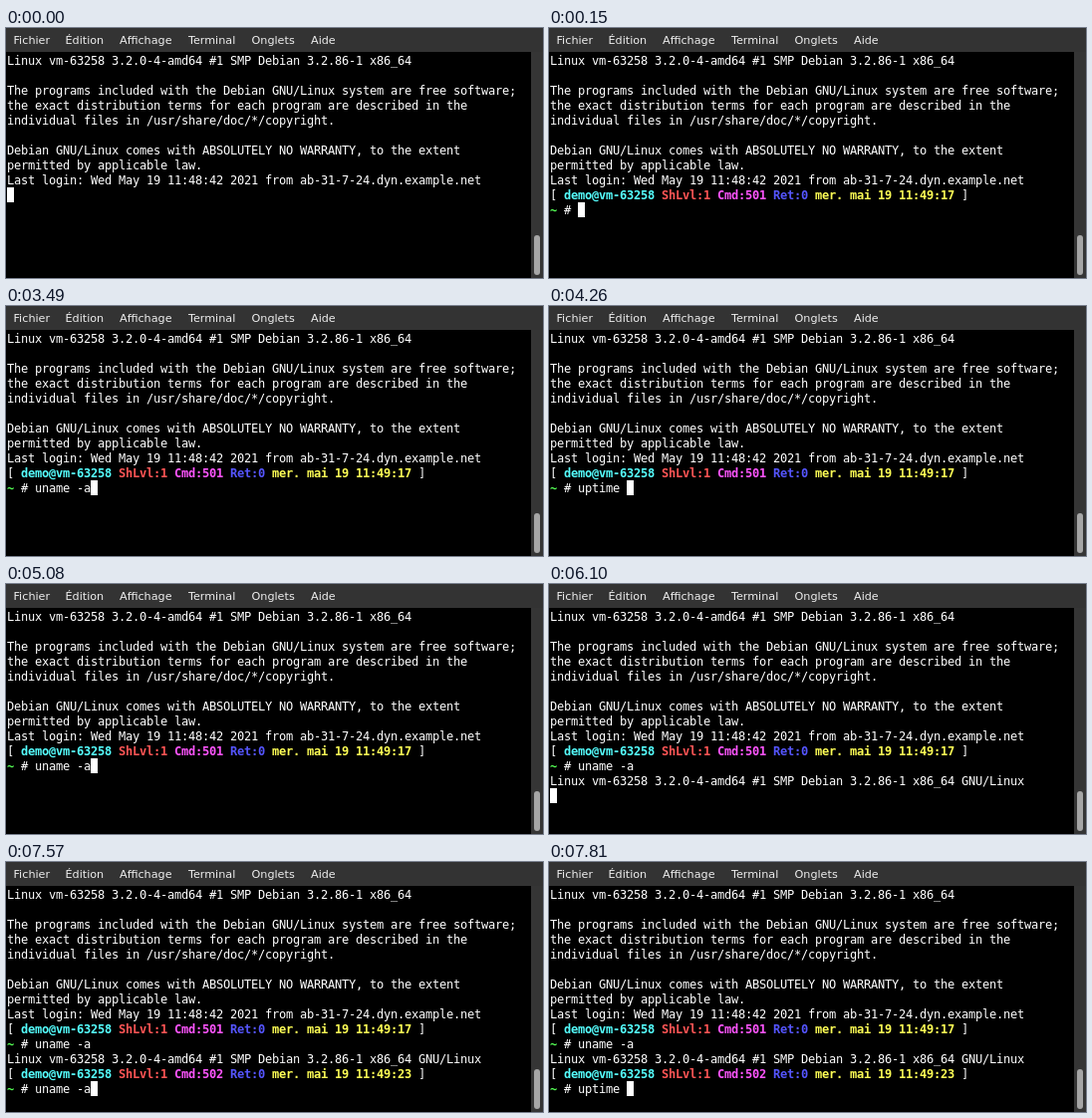
Animation, 539 px wide and 251 px high, one loop 8 s. Source, as an HTML page:

```html
<!DOCTYPE html>
<html lang="fr">
<head>
<meta charset="utf-8">
<title>Terminal</title>
<style>
  html, body { margin: 0; width: 100%; height: 100%; overflow: hidden; background: #000; }
  svg { display: block; }
  text { white-space: pre; }
  .menu { font: 11.2px "DejaVu Sans", sans-serif; fill: #eee; }
  .term { font: 12px "DejaVu Sans Mono", monospace; fill: #fff; }
  .bold { font-weight: bold; }
</style>
</head>
<body>
<svg id="stage" width="539" height="251" viewBox="0 0 539 251">
  <rect width="539" height="251" fill="#000"/>
  <rect width="539" height="24" fill="#333"/>
  <rect x="527" y="24" width="12" height="227" fill="#353535"/>
  <rect x="530" y="208" width="6" height="40" rx="3" fill="#a6a6a6"/>
  <g id="menu" class="menu"></g>
  <g id="screen" class="term"></g>
  <rect id="cursor" width="7" height="15" fill="#fff"/>
</svg>
<script>
const LOOP = 8000, CELL = 7, ROW = 15, LEFT = 1, TOP = 25, BASELINE = 12;
const HOST = 'vm-63258';
const KERNEL = `Linux ${HOST} 3.2.0-4-amd64 #1 SMP Debian 3.2.86-1 x86_64`;
const byId = id => document.getElementById(id);
const screen = byId('screen'), cursor = byId('cursor');

function addText(parent, str, x, y, attrs = {}) {
  const el = document.createElementNS('http://www.w3.org/2000/svg', 'text');
  for (const [key, value] of Object.entries({ x, y, ...attrs })) el.setAttribute(key, value);
  el.textContent = str;
  parent.append(el);
}

// Every character sits on the terminal's cell grid.
function print(row, col, str, color) {
  const xs = Array.from(str, (_, i) => LEFT + (col + i) * CELL).join(' ');
  addText(screen, str, xs, TOP + row * ROW + BASELINE, color ? { fill: color, class: 'bold' } : {});
}

function printSpans(row, spans) {
  let col = 0;
  for (const [str, color] of spans) {
    print(row, col, str, color);
    col += str.length;
  }
  return col;
}

function status(row, count, clock) {
  printSpans(row, [
    ['[ '], [`demo@${HOST} `, '#55ffff'], ['ShLvl:1 ', '#ff5555'], [`Cmd:${count} `, '#ff55ff'],
    ['Ret:0 ', '#5555ff'], [`mer. mai 19 ${clock} `, '#ffff55'], [']']
  ]);
}

const prompt = (row, command) => printSpans(row, [['~ ', '#55ff55'], ['# '], [command]]);

const banner = [
  KERNEL,
  '',
  'The programs included with the Debian GNU/Linux system are free software;',
  'the exact distribution terms for each program are described in the',
  'individual files in /usr/share/doc/*/copyright.',
  '',
  'Debian GNU/Linux comes with ABSOLUTELY NO WARRANTY, to the extent',
  'permitted by applicable law.',
  'Last login: Wed May 19 11:48:42 2021 from ab-31-7-24.dyn.example.net'
];

// Start time, stage of the session, command on the active prompt
const steps = [
  [0, 'login', ''],
  [150, 'first', ''],
  [2910, 'first', 'uptime '],
  [3140, 'first', 'tail /var/log/syslog'],
  [3490, 'first', 'uname -a'],
  [4260, 'first', 'uptime '],
  [5080, 'first', 'uname -a'],
  [6100, 'output', ''],
  [6200, 'second', ''],
  [7570, 'second', 'uname -a'],
  [7810, 'second', 'uptime ']
];

function draw([, stage, command]) {
  screen.replaceChildren();
  banner.forEach((line, row) => print(row, 0, line));
  let row = 9, col = 0;
  if (stage !== 'login') {
    status(9, 501, '11:49:17');
    row = 10;
    col = prompt(row, stage === 'first' ? command : 'uname -a');
  }
  if (stage === 'output' || stage === 'second') {
    print(11, 0, KERNEL + ' GNU/Linux');
    row = 12;
    col = 0;
  }
  if (stage === 'second') {
    status(12, 502, '11:49:23');
    row = 13;
    col = prompt(row, command);
  }
  cursor.setAttribute('x', LEFT + col * CELL);
  cursor.setAttribute('y', TOP + row * ROW);
}

const menu = { Fichier: 7.5, Édition: 59.5, Affichage: 114, Terminal: 183, Onglets: 246.5, Aide: 306 };
for (const [label, x] of Object.entries(menu)) addText(byId('menu'), label, x, 16);

const start = performance.now();
let current;
function frame() {
  const time = (performance.now() - start) % LOOP;
  const step = steps.findLast(([from]) => from <= time);
  if (step !== current) draw(current = step);
  requestAnimationFrame(frame);
}
frame();
</script>
</body>
</html>
```
